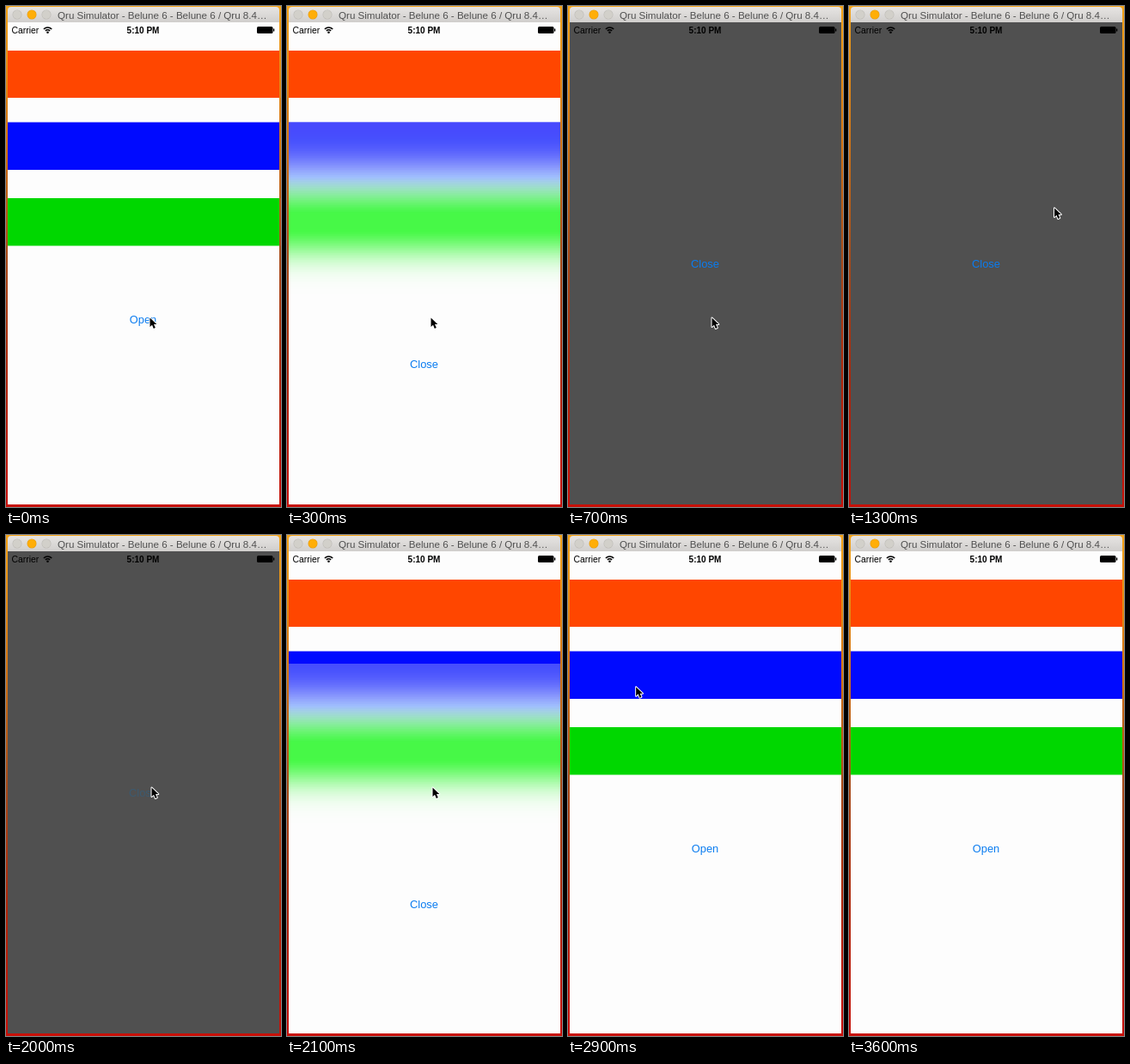
These frames come from a looping animation (320x584 px, 3.7 s). An HTML page with a canvas:

```html
<!DOCTYPE html>
<html lang="en">
<head>
<meta charset="utf-8">
<style>
html, body { margin: 0; width: 100%; height: 100%; overflow: hidden; }
canvas { display: block; width: 320px; height: 584px; }
</style>
</head>
<body>
<canvas id="stage" width="320" height="584"></canvas>
<script>
const LOOP = 3700, STEP = 100;
const OPEN_AT = 139, DARK_AT = 700, CLOSE_AT = 2050;
const TOP = 19, BOTTOM = 581, LEFT = 2, WIDTH = 316;
const SIGMA = 21, REACH = 60, SATURATION = 1.5, TINT = 0.28;
const PAPER = [253, 253, 253];
const BLUE = '#0a7cf0';
const BARS = [
  { y: 52, h: 55, rgb: [255, 70, 0] },
  { y: 135.5, h: 55.5, rgb: [0, 10, 255] },
  { y: 224, h: 55.5, rgb: [0, 215, 0] }
];
// Pointer tip: time, x, y
const PATH = [
  [0, 167, 363], [800, 167, 363], [1200, 215, 280], [1400, 262, 190],
  [1600, 110, 180], [1800, 150, 310], [1950, 169, 294], [2400, 169, 294],
  [2600, 215, 345], [2700, 228, 310], [3000, 4, 110], [3100, -20, 90]
];
const ctx = document.getElementById('stage').getContext('2d');
const rgb = c => `rgb(${c.map(Math.round)})`;

function rect(x, y, w, h, fill) {
  ctx.fillStyle = fill;
  ctx.fillRect(x, y, w, h);
}

function text(s, x, y, size, fill, align = 'left', weight = '') {
  ctx.font = `${weight} ${size}px "Liberation Sans", Arial, sans-serif`;
  ctx.textAlign = align;
  ctx.fillStyle = fill;
  ctx.fillText(s, x, y);
}

function disc(x, y, r, fill) {
  ctx.fillStyle = fill;
  ctx.beginPath();
  ctx.arc(x, y, r, 0, 7);
  ctx.fill();
}

function fade(y0, y1, ...colors) {
  const g = ctx.createLinearGradient(0, y0, 0, y1);
  colors.forEach((c, i) => g.addColorStop(i / (colors.length - 1), c));
  return g;
}

// Remaining share of a critically damped slide
function spring(ms) {
  const k = Math.max(0, ms) * 0.01826;
  return (1 + k) * Math.exp(-k);
}

function rowColor(y) {
  const bar = BARS.find(b => y >= b.y && y < b.y + b.h);
  return bar ? bar.rgb : PAPER;
}

// Saturate, then lay translucent white on top
function glaze(c) {
  const luma = 0.21 * c[0] + 0.72 * c[1] + 0.07 * c[2];
  return c.map(v => {
    const vivid = Math.min(253, Math.max(0, luma + (v - luma) * SATURATION));
    return vivid + (253 - vivid) * TINT;
  });
}

// Frosted copy of the rows below the sheet's top edge
function frost(top) {
  for (let y = Math.round(top); y < BOTTOM; y++) {
    const sum = [0, 0, 0];
    let total = 0;
    for (let d = -REACH; d <= REACH; d += 2) {
      const weight = Math.exp(-d * d / (2 * SIGMA * SIGMA));
      const c = rowColor(Math.max(top + 1, y + d));
      total += weight;
      for (let i = 0; i < 3; i++) sum[i] += c[i] * weight;
    }
    rect(LEFT, y, WIDTH, 1, rgb(glaze(sum.map(v => v / total))));
  }
}

function drawWindow() {
  rect(0, 0, 320, 584, fade(0, 584, '#f5a418', '#d87812', '#a84a18', '#b02408', '#c81008'));
  ctx.fillStyle = fade(0, TOP, '#e8e6e4', '#d0cecc');
  ctx.beginPath();
  ctx.roundRect(LEFT, 1, WIDTH, TOP - 1, [4, 4, 0, 0]);
  ctx.fill();
  [13, 30, 47].forEach((x, i) => {
    disc(x, 10, 5.5, i === 1 ? '#e29a14' : '#bdbbb6');
    disc(x, 10, 4.9, i === 1 ? '#ffae08' : '#d2d0ca');
  });
  text('Qru Simulator - Belune 6 - Belune 6 / Qru 8.4…', 60, 14.5, 11.6, '#505050');
}

function drawStatus() {
  text('Carrier', 6.5, 32, 10.4, '#000');
  text('5:10 PM', 159.5, 32, 10, '#000', 'center', 'bold');
  ctx.strokeStyle = '#000';
  ctx.lineWidth = 1.5;
  for (const r of [3.7, 6.5]) {
    ctx.beginPath();
    ctx.arc(48.5, 31.5, r, -2.36, -0.78);
    ctx.stroke();
  }
  disc(48.5, 30.8, 1.3, '#000');
  ctx.fillStyle = '#000';
  ctx.beginPath();
  ctx.roundRect(292, 24, 18.5, 8, 1.5);
  ctx.fill();
  rect(311, 26.5, 1.3, 3, '#000');
}

function drawPointer(t) {
  const i = PATH.findIndex(p => p[0] > t);
  if (i < 0) return;
  const [t0, x0, y0] = PATH[i - 1], [t1, x1, y1] = PATH[i];
  const k = (t - t0) / (t1 - t0);
  ctx.save();
  ctx.translate(x0 + (x1 - x0) * k, y0 + (y1 - y0) * k);
  const arrow = new Path2D('M0.5 0.5V11L3 8.7L4.8 13L6.8 12.1L5 8H8.3Z');
  ctx.lineWidth = 2;
  ctx.lineJoin = 'round';
  ctx.strokeStyle = '#fff';
  ctx.stroke(arrow);
  ctx.fillStyle = '#000';
  ctx.fill(arrow);
  ctx.restore();
}

function draw(t) {
  const dark = t >= DARK_AT && t < CLOSE_AT;
  const travel = BOTTOM - TOP;
  const offset = dark ? 0
    : travel * (t < DARK_AT ? spring(t - OPEN_AT) : 1 - spring(t - CLOSE_AT));

  drawWindow();
  rect(LEFT, TOP, WIDTH, travel, dark ? '#505050' : rgb(PAPER));
  ctx.save();
  ctx.beginPath();
  ctx.rect(LEFT, TOP, WIDTH, travel);
  ctx.clip();
  if (!dark) {
    for (const b of BARS) rect(LEFT, b.y, WIDTH, b.h, rgb(b.rgb));
    text('Open', 159.5, 370, 12.8, t === 100 ? '#b5d5fa' : BLUE, 'center');
    if (offset < travel - 1) frost(TOP + offset);
  }
  const pressed = dark && t >= 1950;
  text('Close', 159.5, 304.7 + offset, 12.9, pressed ? '#3c5a70' : BLUE, 'center');
  ctx.restore();
  drawStatus();
  drawPointer(t);
}

const start = performance.now();
let last = -1;
function tick(now) {
  const t = Math.floor(Math.max(0, now - start) % LOOP / STEP) * STEP;
  if (t !== last) draw(last = t);
  requestAnimationFrame(tick);
}
tick(start);
</script>
</body>
</html>
```
